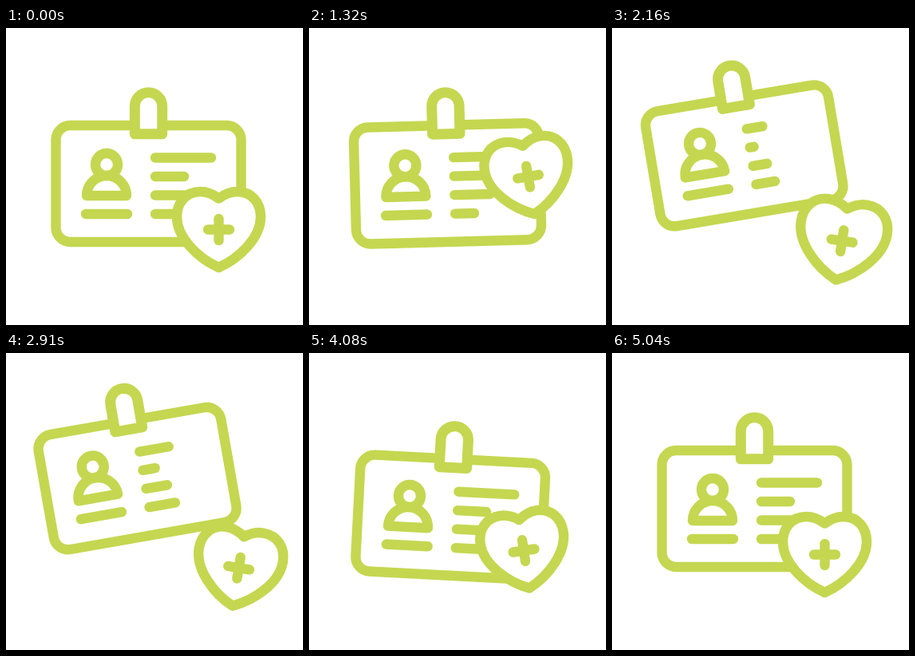
These frames come from a looping animation (372 by 372 pixels, 5400 ms). An HTML page:

```html
<!DOCTYPE html>
<html lang="en">
<head>
<meta charset="utf-8">
<title>Health card</title>
<style>
  html, body { margin: 0; width: 100%; height: 100%; overflow: hidden; background: #fff; }
  svg { display: block; width: 100%; height: 100%; }
  g { fill: none; stroke: #c5d750; stroke-width: 12.4; stroke-linecap: round; stroke-linejoin: round; }
  .solid { fill: #fff; }
</style>
</head>
<body>
<svg viewBox="0 0 372 372">
  <g id="card">
    <rect x="-116" y="-73" width="232" height="146" rx="18"/>
    <path class="solid" stroke-width="13" d="M-17.2 -62.2V-97a17.2 17.2 0 0 1 34.4 0V-62.2Z"/>
    <circle cx="-52.5" cy="-24" r="14"/>
    <path d="M-77.5 15a25 25 0 0 1 50 0ZM-78.5 38h52"/>
    <path id="text"/>
  </g>
  <g id="heart">
    <path id="outline" class="solid" d="M0 -39C-8 -45 -15 -47.5 -23 -47.5C-41 -47.5 -52.5 -34 -52.5 -16C-52.5 10 -26 36 0 47.5C26 36 52.5 10 52.5 -16C52.5 -34 41 -47.5 23 -47.5C15 -47.5 8 -45 0 -39Z"/>
    <path d="M-13.5 0h27M0 -13.5v27"/>
  </g>
</svg>
<script>
const LOOP = 5400;
const STROKE = 12.4;
const REST = { card: [178.5, 195, 0], heart: [266.5, 252.5, 0] };

// Key poses as offsets from rest: x, y, angle
const POSES = [
  { at: 180, card: [0, 0, 0], heart: [0, 0, 0] },
  { at: 780, card: [-12, 24, 5.3], heart: [-1.5, -27.5, -5] },     // lean back
  { at: 1130, card: [-28, 40, 10], heart: [9, -90, -11] },         // wound up
  { at: 1320, card: [-5, 0, -1.5], heart: [8, -66.5, -10] },       // swing through
  { at: 1600, card: [-11, -31, -8.8], heart: [17.5, 10.5, 8] },    // lifted
  { at: 3120, card: [-14, -38, -10], heart: [26, 17.5, 9.5] },     // slow drift
  { at: 3480, card: [-5, -24, -5.2], heart: [27.5, 19, 8] },       // turning back
  { at: 4080, card: [-1.3, 10.7, 3], heart: [2.5, -5, -8.5] },     // overshoot
  { at: 4900, card: [0, 0, 0], heart: [0, 0, 0] }
];

const TEXT_LINES = [
  { full: 70, short: 20, eraseAt: 1320 },
  { full: 36, short: 5, eraseAt: 1320 },
  { full: 44, short: 18, eraseAt: 1320 },
  { full: 50, short: 24, eraseAt: 180 }
];

const $ = id => document.getElementById(id);

// Smooth step from 0 to 1 between two times
function ramp(t, from, to) {
  const u = Math.min(1, Math.max(0, (t - from) / (to - from)));
  return u * u * (3 - 2 * u);
}

// Smooth curve through the poses that never overshoots them
function offset(part, axis, t) {
  const last = POSES.length - 1;
  const time = Math.min(POSES[last].at, Math.max(POSES[0].at, t));
  const i = Math.max(0, POSES.findIndex(pose => pose.at >= time) - 1);
  const value = k => POSES[k][part][axis];
  const slope = k => (value(k + 1) - value(k)) / (POSES[k + 1].at - POSES[k].at);
  const tangent = k => {
    if (k === 0 || k === last) return 0;
    const before = slope(k - 1), after = slope(k);
    return before * after <= 0 ? 0 : 2 * before * after / (before + after);
  };
  const span = POSES[i + 1].at - POSES[i].at;
  const u = (time - POSES[i].at) / span, v = 1 - u;
  return value(i) * v * v * (1 + 2 * u) + value(i + 1) * u * u * (1 + 2 * v)
    + span * u * v * (tangent(i) * v - tangent(i + 1) * u);
}

function place(part, t) {
  const [x, y, angle] = REST[part].map((rest, axis) => rest + offset(part, axis, t));
  $(part).setAttribute('transform', `translate(${x} ${y}) rotate(${angle})`);
}

function heartScale(t) {
  const strength = ramp(t, 1320, 1700) - ramp(t, 3500, 4080);
  return 1 + strength * (0.075 * Math.cos(2 * Math.PI * (t - 2160) / 870) - 0.035);
}

function textPath(t) {
  return TEXT_LINES.map(({ full, short, eraseAt }, i) => {
    const erased = ramp(t, eraseAt, eraseAt + 600) - ramp(t, 2160, 4080);
    return `M8.5 ${-32.5 + 23.5 * i}h${full + (short - full) * erased}`;
  }).join('');
}

function draw() {
  const t = performance.now() % LOOP;
  const scale = heartScale(t);
  place('card', t);
  place('heart', t);
  $('outline').setAttribute('transform', `scale(${scale})`);
  $('outline').setAttribute('stroke-width', STROKE / scale);
  $('text').setAttribute('d', textPath(t));
  requestAnimationFrame(draw);
}

draw();
</script>
</body>
</html>
```
